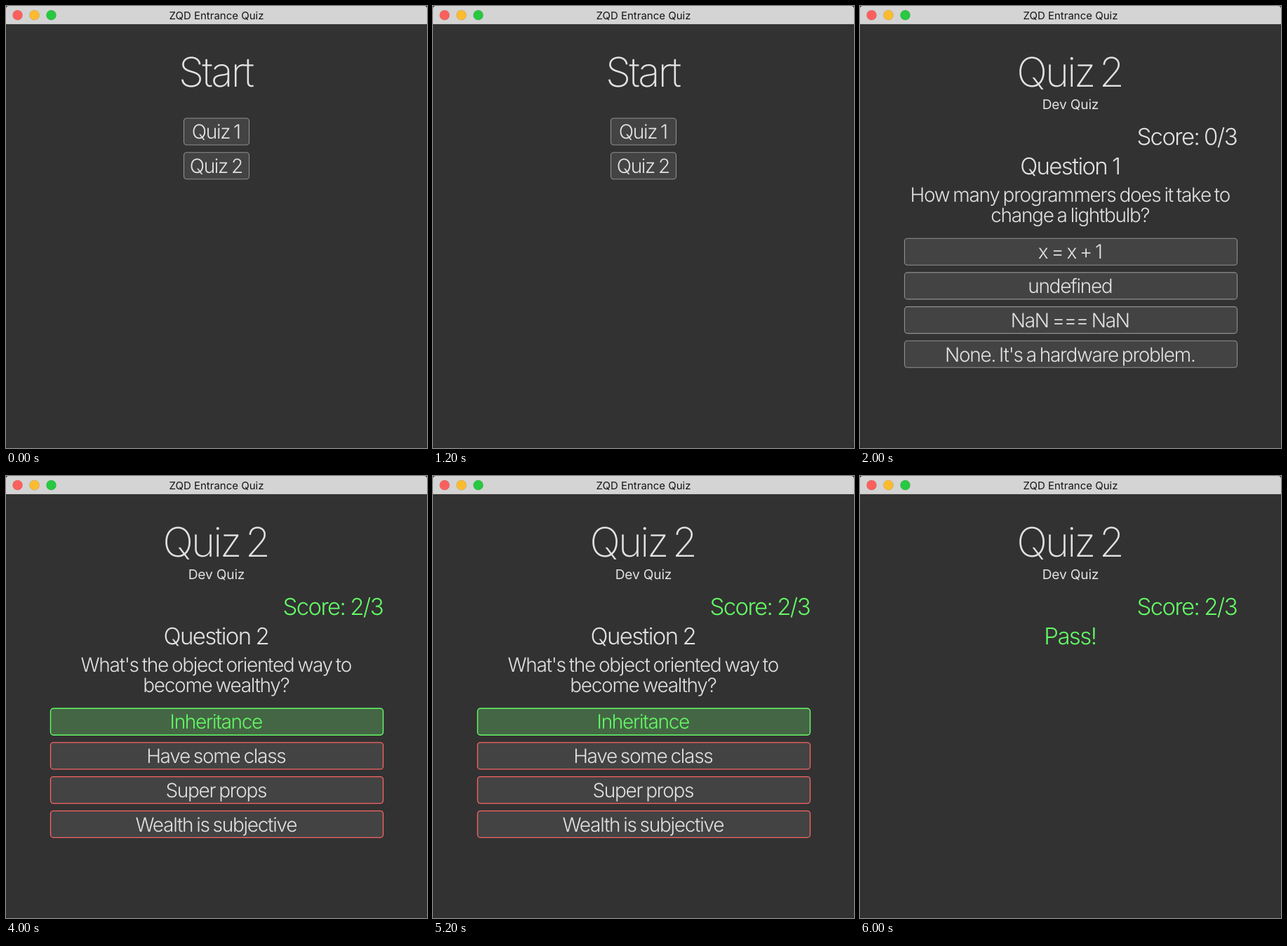
Recreate the animation shown at these times as an HTML page. Size 600 by 630 pixels, loop 8000 ms.

```html
<!DOCTYPE html>
<html lang="en">
<head>
<meta charset="utf-8">
<title>Entrance Quiz</title>
<style>
  html, body { margin: 0; width: 100%; height: 100%; overflow: hidden; background: #222; }
  svg { display: block; width: 600px; height: 630px; }
  text {
    font-family: Inter, "Open Sans", sans-serif;
    font-variation-settings: "opsz" 14;
    font-variant-ligatures: none;
    text-rendering: geometricPrecision;
    text-anchor: middle;
    fill: #e2e2e2;
  }
  .bar { font-size: 15px; font-weight: 400; fill: #151515; }
  .title { font-size: 58px; font-weight: 200; letter-spacing: -.05em; word-spacing: -.1em; }
  .sub { font-size: 19.2px; font-weight: 400; letter-spacing: -.01em; }
  .head { font-size: 33px; font-weight: 300; letter-spacing: -.05em; word-spacing: -.02em; }
  .body { font-size: 28px; font-weight: 300; letter-spacing: -.046em; word-spacing: -.057em; }
  .score { text-anchor: end; }
  .good { fill: #64fb66; }
  .lights circle { stroke: rgba(0, 0, 0, .1); }
  rect.btn { fill: #434343; stroke: #8f8f8f; stroke-width: 1.1; }
  rect.right { fill: #446644; stroke: #64fb66; stroke-width: 1.4; }
  rect.wrong { stroke: #fa6464; stroke-width: 1.3; }
</style>
</head>
<body>
<svg viewBox="0 0 600 630">
  <rect width="600" height="630" rx="4" fill="#323232"/>
  <path d="M0 26V4a4 4 0 0 1 4-4H596a4 4 0 0 1 4 4V26Z" fill="#d4d4d4"/>
  <rect y="25" width="600" height="1" fill="#c4c4c4"/>
  <g class="lights">
    <circle cx="16.5" cy="13" r="7" fill="#fc605c"/>
    <circle cx="40.5" cy="13" r="7" fill="#fdbc2f"/>
    <circle cx="64.5" cy="13" r="7" fill="#27c940"/>
  </g>
  <text class="bar" x="300" y="19">ZQD Entrance Quiz</text>
  <g id="page"></g>
</svg>
<script>
  const HOLD = 2000;
  const PITCH = 48.7;
  const page = document.getElementById('page');

  const text = (s, cls, y, x = 299.3) =>
    `<text class="${cls}" x="${x}" y="${y}">${s}</text>`;

  const button = (s, x, y, w, state = '') =>
    `<rect class="btn ${state}" x="${x}" y="${y}" width="${w}" height="38" rx="4"/>` +
    text(s, 'body' + (state === 'right' ? ' good' : ''), y + 29.2);

  const column = (labels, x, y, w, states = []) =>
    labels.map((s, i) => button(s, x, y + i * PITCH, w, states[i])).join('');

  const header = (score, cls = '') =>
    text('Quiz 2', 'title', 115, 298.6) +
    text('Dev Quiz', 'sub', 147.3, 300) +
    text(`Score: ${score}/3`, `head score ${cls}`, 198, 537);

  const question = (n, lines, answers, states) =>
    text(`Question ${n}`, 'head', 240) +
    lines.map((s, i) => text(s, 'body', 279.2 + i * 28.5)).join('') +
    column(answers, 63.5, 331.2, 474, states);

  const pages = [
    text('Start', 'title', 115, 298.6) +
      column(['Quiz 1', 'Quiz 2'], 253.5, 160, 93),

    header(0) + question(1,
      ['How many programmers does it take to', 'change a lightbulb?'],
      ['x = x + 1', 'undefined', 'NaN === NaN', "None. It's a hardware problem."]),

    header(2, 'good') + question(2,
      ["What's the object oriented way to", 'become wealthy?'],
      ['Inheritance', 'Have some class', 'Super props', 'Wealth is subjective'],
      ['right', 'wrong', 'wrong', 'wrong']),

    header(2, 'good') + text('Pass!', 'head good', 240)
  ];

  let shown = -1;
  function tick() {
    const i = Math.floor(performance.now() / HOLD) % pages.length;
    if (i !== shown) page.innerHTML = pages[shown = i];
    requestAnimationFrame(tick);
  }
  tick();
</script>
</body>
</html>
```
